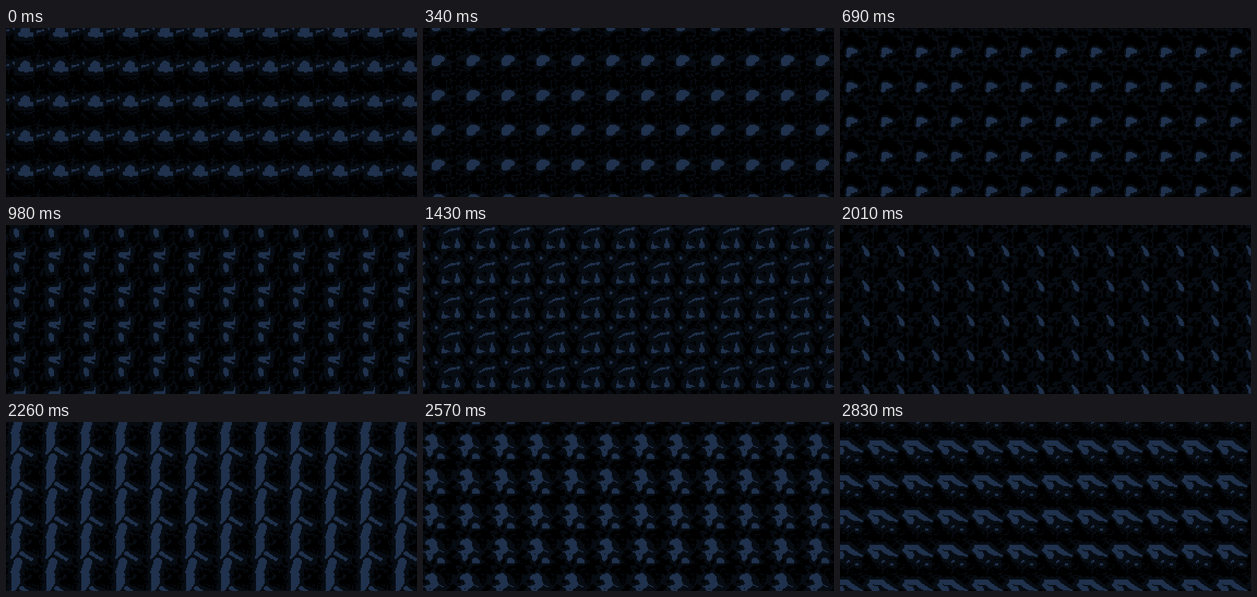
Animation, 753 px wide and 311 px high, one loop 2.85 s. Source, as an HTML page with a canvas:

```html
<!DOCTYPE html>
<html lang="en">
<head>
<meta charset="utf-8">
<title>Night camouflage</title>
<style>
  html, body { margin: 0; width: 100%; height: 100%; overflow: hidden; background: #000; }
  canvas { display: block; width: 753px; height: 311px; }
</style>
</head>
<body>
<canvas id="stage" width="753" height="311"></canvas>
<script>
const W = 753, H = 311;
const LOOP = 2850, STEP = 25, FRAMES = 114;
const TILE = 64, CELL = 2, N = TILE / CELL;
const BRIGHT = [31, 49, 76], DARK = [7, 12, 19], BLACK = [0, 0, 0];

const ctx = document.getElementById('stage').getContext('2d');
const tile = document.createElement('canvas');
tile.width = tile.height = N;
const tileCtx = tile.getContext('2d');
const image = tileCtx.createImageData(N, N);

const mod = (a, n) => ((a % n) + n) % n;
const wrap = d => mod(d + TILE / 2, TILE) - TILE / 2;
const mix = (a, b, u) => a + (b - a) * u;
const smooth = u => u * u * (3 - 2 * u);

// Seeded random number from -1 to 1.
function hash(x, y, z) {
  let h = Math.imul(x + 11, 374761393) ^ Math.imul(y + 7, 668265263) ^ Math.imul(z + 3, 1274126177);
  h = Math.imul(h ^ (h >>> 13), 1103515245);
  return ((h ^ (h >>> 16)) >>> 0) / 2147483648 - 1;
}

// Value noise that repeats every `size` lattice points in x and y.
function noise(cx, cy, size, z) {
  const x = cx * size / N, y = cy * size / N;
  const i = Math.floor(x), j = Math.floor(y), k = Math.floor(z);
  const u = smooth(x - i), v = smooth(y - j), w = smooth(z - k);
  const at = (a, b, c) => hash(mod(i + a, size), mod(j + b, size), k + c);
  const layer = c => mix(mix(at(0, 0, c), at(1, 0, c), u), mix(at(0, 1, c), at(1, 1, c), u), v);
  return mix(layer(0), layer(1), w);
}

// Distance to a tapered segment on the repeating tile.
function segment(px, py, [x1, y1, r1], [x2, y2, r2]) {
  const dx = x2 - x1, dy = y2 - y1;
  const x = wrap(px - x1 - dx / 2) + dx / 2, y = wrap(py - y1 - dy / 2) + dy / 2;
  const u = Math.max(0, Math.min(1, (x * dx + y * dy) / (dx * dx + dy * dy || 1)));
  return Math.hypot(x - u * dx, y - u * dy) - mix(r1, r2, u);
}

const chain = (px, py, points) =>
  Math.min(...points.map((p, i) => segment(px, py, p, points[i + 1] || p)));

// A pose is a few brush strokes, each a chain of [x, y, radius].
function pose(frame, halo, lace, ...strokes) {
  const field = Float32Array.from({ length: N * N }, (_, i) => {
    const px = (i % N + 0.5) * CELL, py = (Math.floor(i / N) + 0.5) * CELL;
    return Math.min(...strokes.map(s => chain(px, py, s)));
  });
  const mean = axis => strokes[0].reduce((sum, p) => sum + p[axis], 0) / strokes[0].length;
  return { frame, halo, lace, field, x: mean(0), y: mean(1) };
}

const poses = [
  pose(0, 7, 0.08,
    [[35, -1, 2], [35, 7, 10]], [[26, 12, 4], [46, 12, 4]], [[14, 1, 3]], [[57, 7, 2], [68, 4, 2]]),
  pose(27, 5, 0.15,
    [[15, 51, 4], [19, 42, 7], [30, 43, 3]]),
  pose(39, 8, 0.12,
    [[35, 43, 1], [34, 53, 2.5], [18, 55, 4], [32, 62, 2]], [[18, 11, 5], [20, 19, 4]]),
  pose(57, 8, 0.12,
    [[62, 25, 1], [63, 38, 5]], [[39, 15, 1], [50, 9, 2], [66, 7, 2]],
    [[37, 32, 1], [37, 40, 4], [50, 41, 1]], [[24, 61, 3]]),
  pose(80, 3, 0.28,
    [[42, 40, 2], [47, 47, 4], [50, 54, 4]]),
  pose(90, 7, 0.1,
    [[22, 2, 8], [17, 18, 8], [18, 42, 7], [10, 58, 2]], [[28, 50, 4], [47, 61, 3]]),
  pose(113, 6, 0.1,
    [[58, 38, 5], [76, 39, 5], [88, 48, 5], [103, 54, 2]], [[53, 44, 3], [65, 53, 7]],
    [[76, 66, 1], [81, 64, 2]], [[95, 70, 2.5]])
];

// Looks up a pose moved by (sx, sy) cells.
const shifted = (p, x, y, sx, sy) => p.field[mod(y - sy, N) * N + mod(x - sx, N)];

function paint(frame) {
  const next = Math.max(1, poses.findIndex(p => p.frame >= frame));
  const a = poses[next - 1], b = poses[next];
  const u = (frame - a.frame) / (b.frame - a.frame), w = Math.sin(Math.PI * u);
  const dx = Math.round(wrap(b.x - a.x) / CELL), dy = Math.round(wrap(b.y - a.y) / CELL);
  const ax = Math.round(dx * u), ay = Math.round(dy * u);
  const halo = mix(a.halo, b.halo, u), lace = mix(a.lace, b.lace, u);

  for (let y = 0; y < N; y++) for (let x = 0; x < N; x++) {
    const rough = noise(x, y, 16, frame / 4), coarse = noise(x, y, 7, 50 + frame / 8);
    const bright = mix(shifted(a, x, y, ax, ay), shifted(b, x, y, ax - dx, ay - dy), u)
      + w * (4 * coarse - 1) + rough;
    const inHalo = bright + 3 * coarse + rough < halo;
    const inLace = Math.abs(coarse + 0.25 * rough) < lace;
    const color = bright < 0 ? BRIGHT : inHalo || inLace ? DARK : BLACK;
    image.data.set([...color, 255], (y * N + x) * 4);
  }
  tileCtx.putImageData(image, 0, 0);

  ctx.imageSmoothingEnabled = false;
  for (let y = 0; y < H; y += TILE)
    for (let x = 0; x < W; x += TILE) ctx.drawImage(tile, x, y, TILE, TILE);
}

const start = performance.now();
let shown = -1;
function tick() {
  const t = (performance.now() - start) % LOOP;
  const frame = Math.min(FRAMES - 1, Math.floor((t + 5) / STEP));
  if (frame !== shown) paint(shown = frame);
  requestAnimationFrame(tick);
}
tick();
</script>
</body>
</html>
```
